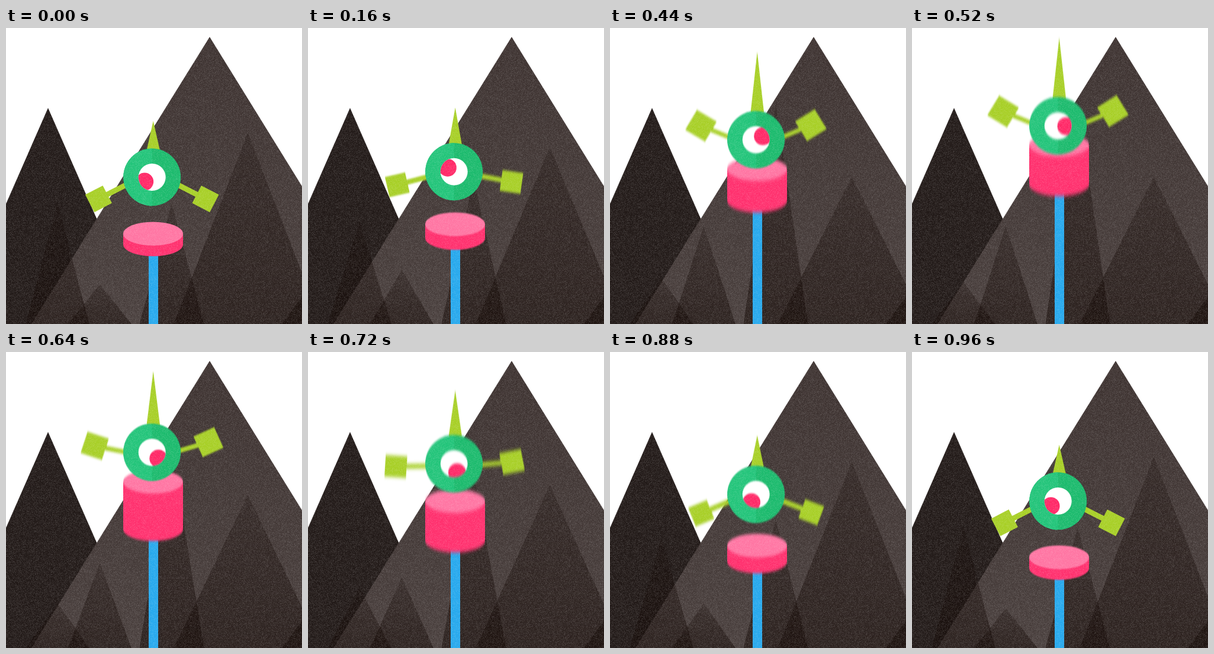
An HTML page with a canvas that plays this animation: 500x500 px, repeating every 1000 ms.

```html
<!DOCTYPE html>
<html lang="en">
<head>
<meta charset="utf-8">
<title>Bouncing eye</title>
<style>
  html, body { margin: 0; width: 100%; height: 100%; overflow: hidden; background: #fff; }
  svg, canvas { position: absolute; left: 0; top: 0; width: 100%; height: 100%; display: block; }
</style>
</head>
<body>
<svg viewBox="0 0 500 500">
  <defs>
    <linearGradient id="rock" x1="0" y1="0" x2="0" y2="1">
      <stop offset="0" stop-color="#3c312f"/>
      <stop offset="1" stop-color="#483e3c"/>
    </linearGradient>
    <linearGradient id="shade" x1="0" y1="0" x2="0" y2="1">
      <stop offset="0" stop-color="#0f0400" stop-opacity=".25"/>
      <stop offset="1" stop-color="#0f0400" stop-opacity=".5"/>
    </linearGradient>
    <clipPath id="eyeClip"><circle r="23"/></clipPath>
    <g id="blurs"></g>
  </defs>

  <path d="M71 135L231.5 500H-89Z" fill="#211917"/>
  <path d="M344 15L644 500H43Z" fill="url(#rock)"/>
  <g id="peaks" fill="url(#shade)"></g>
  <path d="M466 500L500 454V500Z" fill="#0f0400" fill-opacity=".5"/>

  <rect id="stem" x="241" width="16" fill="#25a8ed"/>
  <g id="drum">
    <path id="side" fill="#ff2f6d"/>
    <ellipse id="lid" cx="248.5" rx="50.5" ry="20" fill="#ff74a2"/>
  </g>

  <g id="arms" fill="#a7cf25" stroke="#a7cf25">
    <g id="left"></g>
    <g id="right"></g>
  </g>

  <g id="head">
    <path id="horn" fill="#a7cf25"/>
    <g id="ball">
      <circle r="48.5" fill="#1aba6c"/>
      <path d="M0 -48.5A48.5 48.5 0 0 0 0 48.5Z" fill="#21c479"/>
      <circle r="23" fill="#fff"/>
      <g clip-path="url(#eyeClip)"><circle id="pupil" r="15" fill="#ff2766"/></g>
    </g>
  </g>
</svg>
<canvas id="grain" width="500" height="500"></canvas>

<script>
const LOOP = 1000, STEP = 40, END = 970;
const CX = 246.7, PIVOT = 25.3, REACH = 73;
const NS = 'http://www.w3.org/2000/svg';
const $ = id => document.getElementById(id);

function set(el, attrs) {
  for (const k in attrs) el.setAttribute(k, attrs[k]);
}

function add(parent, tag, attrs = {}) {
  const el = document.createElementNS(NS, tag);
  set(el, attrs);
  return parent.appendChild(el);
}

const mix = (a, b, u) => a + (b - a) * u;
const rad = deg => deg * Math.PI / 180;

// Easings: a plain power, and a sine that leans forward as k grows.
const power = p => u => u ** p;
const wave = (k = 1) => u => 1 - ((1 + Math.cos(Math.PI * u)) / 2) ** k;

// Goes from rest to the top at time `peak` and back to rest at END.
const hump = (peak, rise, fall) => time => {
  const t = (time + LOOP) % LOOP;
  if (t >= END) return 0;
  return t < peak ? rise(t / peak) : fall((END - t) / (END - peak));
};
const sway = k => hump(END / 2, wave(k), wave(k));

const even = sway(1), eager = sway(1.4);
const jump = hump(530, power(1.9), wave(1.3));
const chase = hump(530, power(1.9), power(1.25));
const stretch = hump(600, power(1.9), wave());

const headY = t => 252 - 90 * jump(t);
const lidY = t => headY(t) + 95.5 - 65.6 * chase(t);
const baseY = t => lidY(t) + 18 + 64 * stretch(t);
const hornY = t => headY(t) - mix(95, 149.5, even(t));

const peaks = [
  { x: 87, half: 53.5, low: 294, high: 430, move: hump(560, wave(1.3), wave(1.3)) },
  { x: 158.5, half: 53.5, low: 433, high: 333, move: even },
  { x: 280, half: 54.5, low: 297, high: 125, move: even },
  { x: 408.5, half: 125, low: 177, high: 251, move: eager }
];
for (const p of peaks) p.el = add($('peaks'), 'path');

const arms = [
  { id: 'left', dir: -1, move: even },
  { id: 'right', dir: 1, move: eager }
];
for (const a of arms) {
  a.line = add($(a.id), 'line');
  a.box = add($(a.id), 'rect', { stroke: 'none' });
  a.angle = t => mix(27, -23, a.move(t));
  a.y = t => headY(t) + 3.6 + REACH * Math.sin(rad(a.angle(t)));
}

// Vertical motion blur, one filter per moving part.
const blurs = {};
for (const id of ['head', 'drum', 'left', 'right']) {
  const filter = add($('blurs'), 'filter', {
    id: 'blur-' + id, filterUnits: 'userSpaceOnUse', x: 0, y: 0,
    width: 500, height: 500, 'color-interpolation-filters': 'sRGB'
  });
  blurs[id] = add(filter, 'feGaussianBlur');
  set($(id), { filter: `url(#blur-${id})` });
}

function blur(id, t, ...ys) {
  const shift = Math.max(...ys.map(y => Math.abs(y(t) - y(t - STEP / 2))));
  set(blurs[id], { stdDeviation: `0 ${(shift * 0.34).toFixed(2)}` });
}

// White specks that only show on the coloured shapes.
function drawGrain() {
  const ctx = $('grain').getContext('2d');
  const img = ctx.createImageData(500, 500);
  let seed = 7;
  for (let i = 0; i < img.data.length; i += 4) {
    seed = (seed * 1664525 + 1013904223) % 4294967296;
    const r = seed / 4294967296;
    img.data.fill(255, i, i + 3);
    img.data[i + 3] = r * r * 38;
  }
  ctx.putImageData(img, 0, 0);
}

function drawDrum(t) {
  const lid = lidY(t), base = baseY(t);
  set($('stem'), { y: base, height: 500 - base });
  set($('side'), { d: `M198 ${lid}V${base}A50.5 20 0 0 0 299 ${base}V${lid}Z` });
  set($('lid'), { cy: lid });
  blur('drum', t, lidY, baseY);
}

function drawArm(a, t) {
  const up = a.move(t), size = mix(33.5, 39, up);
  const x1 = CX + a.dir * PIVOT, y1 = headY(t) + 3.6;
  const x2 = x1 + a.dir * REACH * Math.cos(rad(a.angle(t))), y2 = a.y(t);
  const turn = a.dir * mix(27.5, -32, up);
  set(a.line, { x1, y1, x2, y2, 'stroke-width': mix(9, 7.5, up) });
  set(a.box, {
    x: -size / 2, y: -size / 2, width: size, height: size,
    transform: `translate(${x2} ${y2}) rotate(${turn})`
  });
  blur(a.id, t, a.y);
}

function drawHead(t) {
  const y = headY(t), u = Math.min(t / END, 1);
  const look = rad(155 + 360 * u + 8 * Math.sin(Math.PI * u));
  set($('horn'), { d: `M248.7 ${hornY(t)}L260.3 ${y - 44}H237.3Z` });
  set($('ball'), { transform: `translate(${CX} ${y})` });
  set($('pupil'), { cx: 13.8 * Math.cos(look), cy: 1.7 + 13.8 * Math.sin(look) });
  blur('head', t, headY);
}

function draw(t) {
  for (const p of peaks) {
    const y = mix(p.low, p.high, p.move(t));
    set(p.el, { d: `M${p.x} ${y}L${p.x + p.half} 500H${p.x - p.half}Z` });
  }
  drawDrum(t);
  for (const a of arms) drawArm(a, t);
  drawHead(t);
}

const start = performance.now();
function tick() {
  const t = (performance.now() - start) % LOOP;
  draw(Math.floor(t / STEP) * STEP);
  requestAnimationFrame(tick);
}

drawGrain();
tick();
</script>
</body>
</html>
```
